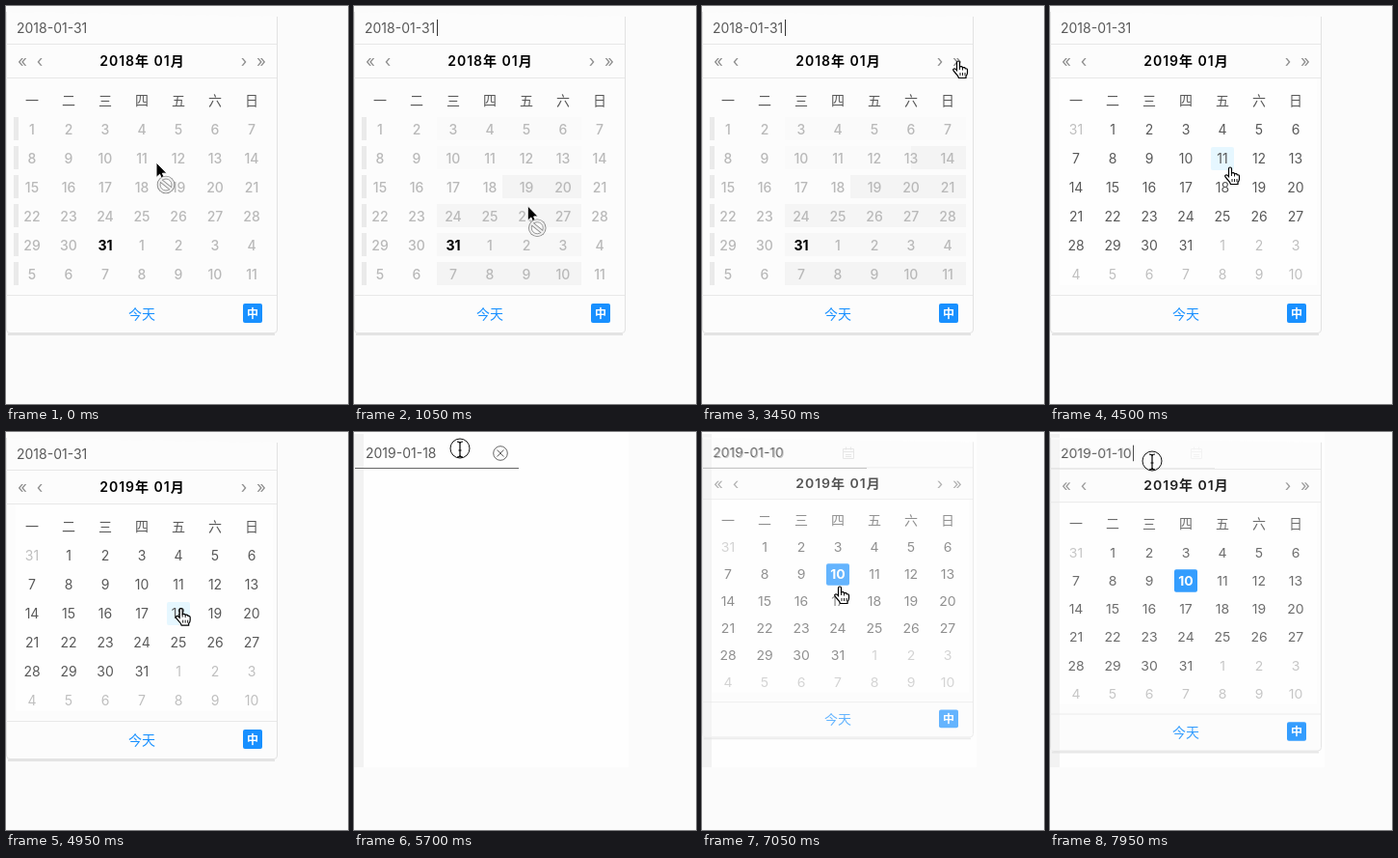
Animation, 355 px wide and 412 px high, one loop 8000 ms. Source, as an HTML page:

```html
<!DOCTYPE html>
<html lang="zh">
<head>
<meta charset="utf-8">
<style>
html, body { margin: 0; width: 100%; height: 100%; overflow: hidden; background: #fbfbfb; }
svg { display: block; font: 14px Inter, "Noto Sans CJK SC", "Noto Sans CJK", sans-serif; fill: #595959; }
</style>
</head>
<body>
<svg id="stage" width="355" height="412" viewBox="0 0 355 412"></svg>
<script>
const LOOP = 8000, STEP = 150;
const BLUE = '#1890ff';
const stage = document.getElementById('stage');

// [time, x, y] of the pointer's hot spot
const POINTER = [
  [0, 156, 162], [150, 156, 162], [600, 175, 182], [1200, 182, 215], [1350, 178, 235],
  [1500, 178, 235], [1800, 205, 286], [2250, 168, 80], [2550, 262, 150], [2700, 262, 225],
  [3000, 262, 150], [3450, 266, 57], [3600, 266, 57], [4500, 187, 167], [4650, 185, 174],
  [5100, 180, 187], [5250, 178, 184], [5700, 110, 17], [5850, 110, 17], [6300, 173, 185],
  [6750, 143, 160], [7050, 143, 160], [7800, 106, 30], [LOOP, 106, 30]
];
// [time, how far the panel is open]
const OPEN = [[0, 1], [5100, 1], [5400, 0], [5700, 0], [6000, 1], [6900, 1], [7350, 0], [7800, 0], [7950, .875], [LOOP, .95]];

function at(keys, t) {
  const i = keys.findIndex(k => k[0] > t), a = keys[i - 1], b = keys[i];
  const p = (t - a[0]) / (b[0] - a[0]);
  return a.slice(1).map((v, j) => v + (b[j + 1] - v) * p);
}

const text = (s, x, y, attrs = '') => `<text x="${x}" y="${y}" ${attrs}>${s}</text>`;
const mid = (s, x, y, attrs = '') => text(s, x, y, 'text-anchor="middle" ' + attrs);
const rect = (x, y, w, h, fill, attrs = '') =>
  `<rect x="${x}" y="${y}" width="${w}" height="${h}" fill="${fill}" ${attrs}/>`;
const path = (d, stroke, attrs = '') => `<path d="${d}" fill="none" stroke="${stroke}" ${attrs}/>`;

// Shading of the days that cannot be chosen
function bands(t) {
  let out = '';
  for (let r = 0; r < 6; r++) {
    const y = 115 + 30 * r;
    out += rect(8, y, 5, 24, '#eaeaea');
    if (t < 600) continue;
    const right = t < 2550 ? 236 : 274, left = r == 2 ? 154 : 86;
    out += rect(left, y, right - left, 24, ['#fafafa', '#fafafa', '#f4f4f4', '#f5f5f5', '#f7f7f7', '#f4f4f4'][r]);
    if (r == 1 && right > 236) out += rect(217, y, 57, 24, '#f4f4f4');
  }
  return out;
}

function days(t, pt) {
  const locked = t < 3750, shift = locked ? 0 : 1;
  const chosen = locked ? 31 : t < 5100 ? 0 : t < 7050 ? 18 : 10;
  let out = '';
  for (let i = 0; i < 42; i++) {
    const n = i - shift + 1, inside = n > 0 && n < 32;
    const x = 27 + 38 * (i % 7), y = 128 + 30 * Math.floor(i / 7);
    const picked = inside && n == chosen;
    const over = Math.abs(pt[0] - x) <= 12 && Math.abs(pt[1] - y) <= 12;
    let style = 'fill="#bfbfbf"';
    if (locked) style = picked ? 'fill="#000" font-weight="700"' : 'fill="#b9b9b9" font-weight="500"';
    else if (picked) style = 'fill="#fff" font-weight="700"';
    else if (inside) style = '';
    if (!locked && (picked || over))
      out += rect(x - 12, y - 12, 24, 24, picked ? BLUE : '#e6f7ff', 'rx="2"');
    out += mid(n < 1 ? 31 : n > 31 ? n - 31 : n, x, y + 5, style);
  }
  return out;
}

function panel(t, open, pt, value) {
  const caret = t >= 300 && t < 3750 ? Math.floor((t - 1850) / 550) % 2 == 0 : t >= 7800;
  const edge = 'M.5 6V335q0 3.5 3.5 3.5H278q3.5 0 3.5-3.5V11';
  const arrow = 'fill="#8c8c8c" font-size="17"';
  let out = path('M2 340H279', '#e4e4e4', 'stroke-width="2"') +
    `<path d="${edge}" fill="#fcfcfc" stroke="#e2e2e2"/>`;
  if (t < 3750) out += bands(t);
  else out += rect(10, 75, 267, 214, '#fefefe');
  if (t >= 5100) out += rect(1, 8, 9, 330, '#f6f6f6');
  out += path('M0 39.5H281M0 74.5H281M0 299.5H281', '#e8e8e8');
  out += text(value, 11, 28);
  if (caret) out += rect(86, 14, 1, 17, '#333');
  [['«', 17], ['‹', 35], ['›', 247], ['»', 265]].forEach(([s, x]) => out += mid(s, x, 63, arrow));
  out += mid((t < 3750 ? 2018 : 2019) + '年 01月', 141.5, 62, 'fill="#000" font-weight="600" letter-spacing="1"');
  [...'一二三四五六日'].forEach((s, i) => out += mid(s, 27 + 38 * i, 103));
  out += days(t, pt);
  out += mid('今天', 141, 324, `fill="${BLUE}"`);
  out += rect(246, 308, 20, 20, BLUE, 'rx="2"') + mid('中', 256, 322.5, 'fill="#fff" font-size="12" font-weight="700"');
  return `<g opacity="${open}" transform="scale(1 ${.8 + .2 * open})">${out}</g>`;
}

function field(t, value) {
  let out = rect(0, 0, 285, 347, '#fefefe') + rect(0, 2, 10, 345, '#f2f2f2');
  out += text(value, 12, 27) + path('M1 37.5H171', '#666');
  out += t < 6000
    ? '<circle cx="152" cy="22" r="7.3" fill="none" stroke="#666"/>' + path('M148.5 18.5l7 7m0-7l-7 7', '#666')
    : path('M146.5 17.5h11v10h-11zM146.5 20.5h11M149.5 15.5v3M154.5 15.5v3M149 23.5h6M149 25.5h6', '#bbb');
  return out;
}

function pointer(t, [x, y], open) {
  let out;
  if (y < 38) {
    out = path('M-3-7q3 0 3 2q0-2 3-2M0-5V7M-3 9q3 0 3-2q0 2 3 2M-1.5 2h3', '#000', 'stroke-width="1.2"');
    if (t >= 5550 && t <= 5850 || t >= 7800)
      out += '<circle r="10" fill="none" stroke="#111"/>';
  } else if (open > .5 && (t >= 3450 || t < 3750 && x > 255 && y < 74)) {
    out = '<path d="M-1.5 1.5q0-1.5 1.5-1.5t1.5 1.5V6q2.5-1 3 .8q2.4-.8 2.8 1q2.2-.4 2.2 1.7V12q0 2-1.5 3.5V17.5H.5' +
      'q-.5-2-2.5-4L-5 10q-.8-1.5.5-2t3 1.5z" fill="#fff" stroke="#000" stroke-width="1.2"/>' +
      path('M1.5 6V9M4.5 7V9.5M2 12V15M4.5 12V15M7 12V15', '#000', 'stroke-width=".9"');
  } else {
    out = '<path d="M0 0V15.5L3.6 12.2L6 18L8.8 16.8L6.4 11.2H11Z" fill="#000" stroke="#fff"/>';
    if (t < 3450 && y > 112 && y < 290)
      out += '<g transform="translate(10 23)"><circle r="9.3" fill="#8a8a8a"/><circle r="8.4" fill="#f0f0f0"/>' +
        '<circle r="6" fill="#fafafa" stroke="#999"/>' +
        path('M-5-4L5 4', '#888', 'stroke-width="4"') + path('M-6-4.8L6 4.8', '#f0f0f0', 'stroke-width="2.2"') + '</g>';
  }
  return `<g transform="translate(${x} ${y})">${out}</g>`;
}

function draw(now) {
  const t = Math.floor(now % LOOP / STEP) * STEP;
  const pt = at(POINTER, t), [open] = at(OPEN, t);
  const value = t < 5100 ? '2018-01-31' : t < 7050 ? '2019-01-18' : '2019-01-10';
  stage.innerHTML = (t >= 5100 ? field(t, value) : '') +
    (open > 0 ? panel(t, open, pt, value) : '') + pointer(t, pt, open);
}

const start = performance.now();
function tick() {
  draw(performance.now() - start);
  requestAnimationFrame(tick);
}
tick();
</script>
</body>
</html>
```
